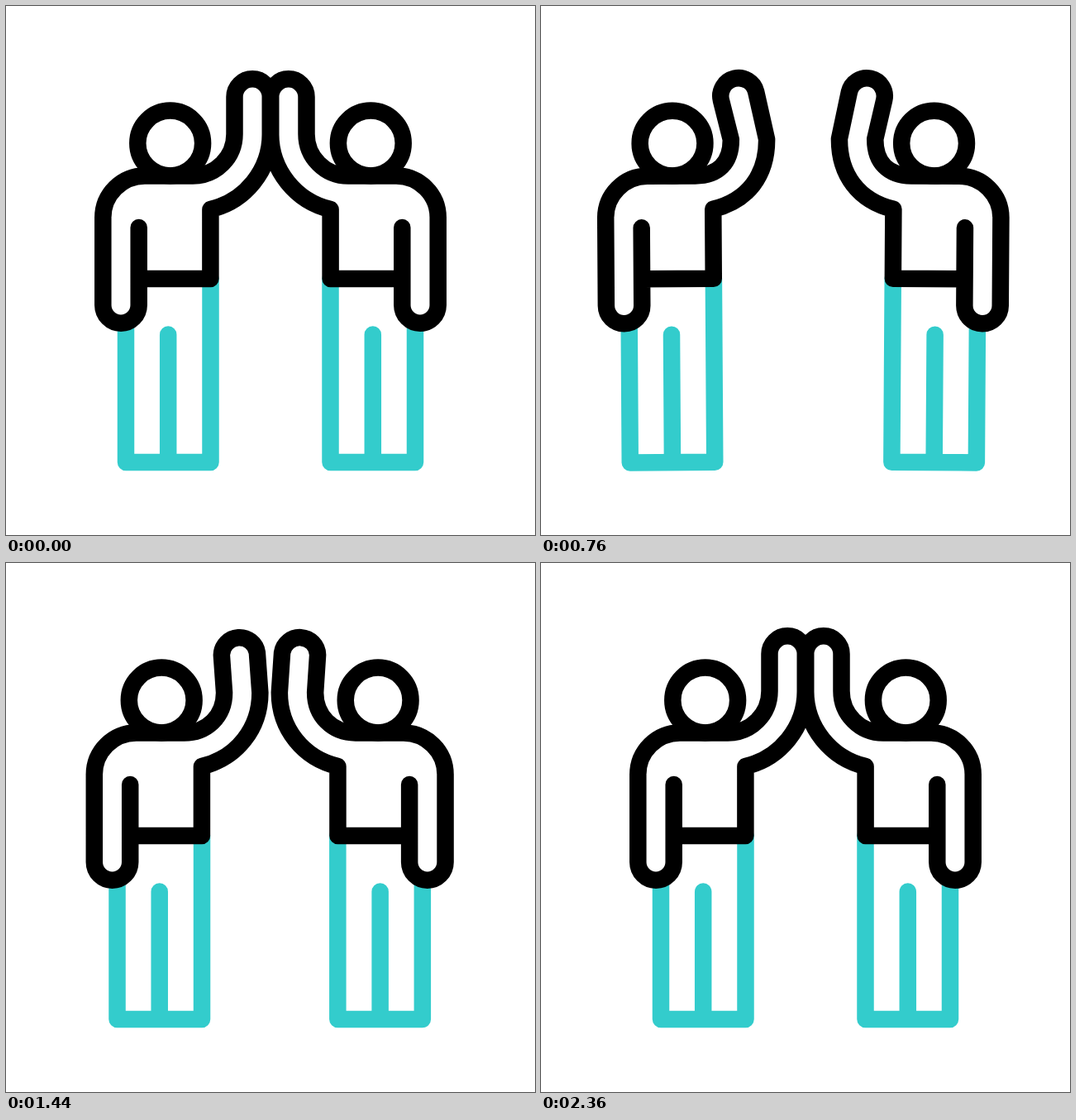
An HTML page for the animation above (2600 ms loop, 640x640 px).

```html
<!DOCTYPE html>
<html lang="en">
<head>
<meta charset="utf-8">
<title>High five</title>
<style>
  html, body { margin: 0; width: 100%; height: 100%; overflow: hidden; background: #fff; }
  svg { display: block; width: 100%; height: 100%; }
  svg * { fill: none; stroke-width: 20.5; stroke-linecap: round; stroke-linejoin: round; }
  .ink { stroke: #000; }
  .teal { stroke: #3cc; }
</style>
</head>
<body>
<svg viewBox="0 0 640 640">
  <defs>
    <path id="legs" class="teal" d="M145 384V552H247.5V330M196.2 397.5V552"/>
  </defs>
  <g class="person">
    <use href="#legs"/>
    <circle class="ink head" cx="198.7" cy="166" r="39.4"/>
    <path class="ink body"/>
  </g>
  <g transform="matrix(-1 0 0 1 640 0)">
    <g class="person">
      <use href="#legs"/>
      <circle class="ink head" cx="198.7" cy="166" r="39.4"/>
      <path class="ink body"/>
    </g>
  </g>
  <path id="sparks" class="teal"/>
</svg>
<script>
const LOOP = 2600, STEP = 40;

const clamp = x => Math.min(1, Math.max(0, x));
const span = (t, from, to) => clamp((t - from) / (to - from));
const smooth = (t, from, to) => {
  const x = span(t, from, to);
  return x * x * (3 - 2 * x);
};
const easeOut = (t, from, to) => 1 - (1 - span(t, from, to)) ** 3;

// peak and rest: distance stepped back; bend: arm bend; nod: head lift
const settings = [
  { peak: 40.5, rest: 37.6, bend: 1, nod: 9.5, nodStart: 1540 },
  { peak: 36, rest: 31.7, bend: 0.92, nod: 9.9, nodStart: 1500 }
];
const people = [...document.querySelectorAll('.person')].map((el, i) => ({
  el,
  head: el.querySelector('.head'),
  body: el.querySelector('.body'),
  ...settings[i]
}));
const sparks = document.getElementById('sparks');

// Each ray runs from its inner end to its outer end
const rays = [
  [319, 104, 319, 33],
  [294, 114, 251, 72.5],
  [346, 114, 388.5, 72.5]
];

function bodyPath(b) {
  const ex = -7 * b, ey = 155 + 6.8 * b;
  const inner = 276.5 + ex, outer = 319.8 + ex;
  return `M160.7 268V362A21.7 21.7 0 0 1 117.3 362V256
    C117.3 228 140 205.5 168 205.5H226
    C254 205.5 ${inner} ${ey + 28} ${inner} ${ey}
    L${276.5 - 18.6 * b} ${110 + 4.4 * b}
    A21.65 21.65 0 0 1 ${319.8 - 19.6 * b} ${110 - 5.8 * b}
    L${outer} ${ey}
    C${outer} ${ey + 43.4} 289.6 236.1 247.4 246V330H160.7`;
}

function drawPerson(p, t) {
  const back = 1 - smooth(t, 1140, 1600);
  const away = p.peak * smooth(t, 110, 660) - (p.peak - p.rest) * easeOut(t, 660, 1020);
  const tilt = 3.45 * (smooth(t, 60, 520) - smooth(t, 520, 820));
  const bend = p.bend * smooth(t, 60, 520) * back;
  const lift = p.nod * (smooth(t, p.nodStart, 1960) - smooth(t, 1960, 2370));

  p.el.setAttribute('transform', `translate(${-away * back} 0) rotate(${-tilt} 218.5 320)`);
  p.head.setAttribute('cy', 166 - lift);
  p.body.setAttribute('d', bodyPath(bend));
}

function drawSparks(t) {
  const tip = easeOut(t, 1515, 1850);
  const tail = smooth(t, 1700, 1980);
  const d = rays.map(([x1, y1, x2, y2]) => {
    const at = k => `${x1 + (x2 - x1) * k} ${y1 + (y2 - y1) * k}`;
    return `M${at(tail)}L${at(tip)}`;
  });
  sparks.setAttribute('d', tip > tail ? d.join('') : '');
}

const start = performance.now();
function draw() {
  const now = (performance.now() - start) % LOOP;
  const t = Math.floor(now / STEP) * STEP;
  people.forEach(p => drawPerson(p, t));
  drawSparks(t);
  requestAnimationFrame(draw);
}
draw();
</script>
</body>
</html>
```
